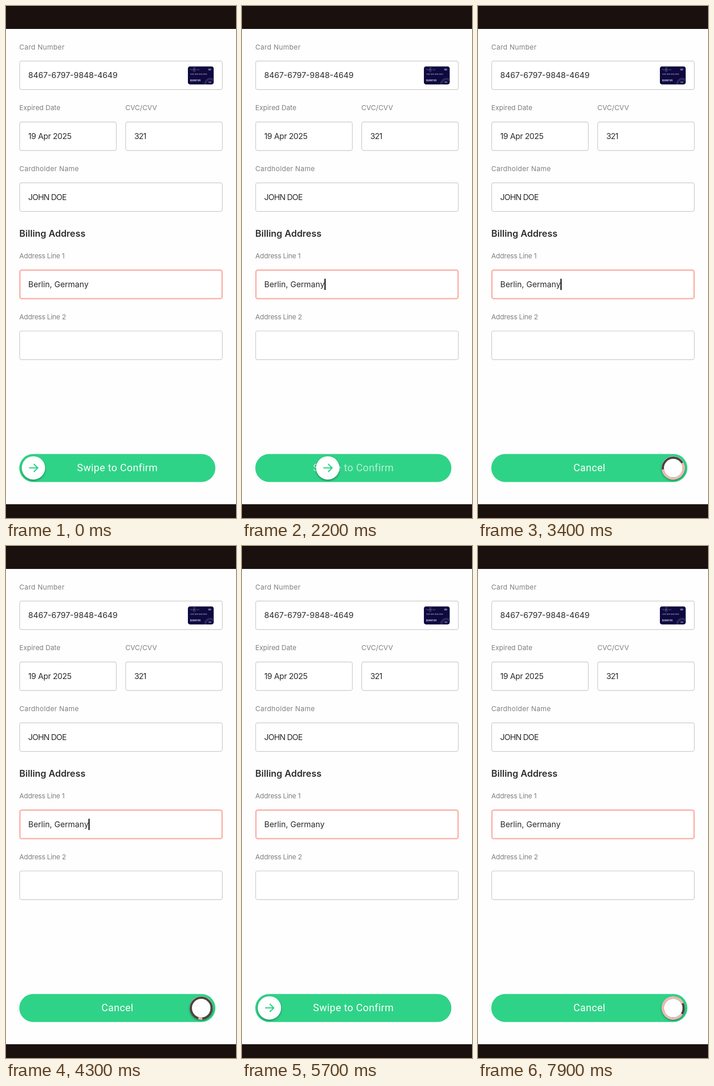
Recreate the animation shown at these times as an HTML page. Size 502 by 1116 pixels, loop 8 s.

```html
<!DOCTYPE html>
<html lang="en">
<head>
<meta charset="utf-8">
<title>Swipe to confirm</title>
<style>
html, body { margin: 0; width: 100%; height: 100%; overflow: hidden; background: #fefefe; }
svg { display: block; width: 100%; height: 100%; }
text { font-family: Inter, "Open Sans", sans-serif; white-space: pre; }
.label { font-size: 15px; fill: #808083; }
.value { font-size: 17.4px; fill: #2b2b2d; }
.title { font-size: 20px; font-weight: 600; fill: #2b2d2e; }
.action { font: 22px Roboto, sans-serif; letter-spacing: .5px; fill: #fff; text-anchor: middle; }
.field { fill: #fff; stroke: #cbcbcb; stroke-width: 1.4; }
.focus { stroke: #fcaea5; stroke-width: 2.8; }
.tiny { fill: #e8e8f2; }
</style>
</head>
<body>
<svg viewBox="0 0 502 1116" preserveAspectRatio="none">
  <defs>
    <filter id="shadow" x="-30%" y="-30%" width="160%" height="170%">
      <feDropShadow dx="0" dy="2.2" stdDeviation="1.9" flood-color="#06391f" flood-opacity=".5"/>
    </filter>
    <clipPath id="cardClip"><rect x="397" y="131.7" width="56.3" height="39.2" rx="4.5"/></clipPath>
    <clipPath id="pill"><rect x="29" y="976.5" width="428" height="61" rx="30.5"/></clipPath>
  </defs>
  <rect width="502" height="1116" fill="#fefefe"/>
  <rect width="502" height="50" fill="#1a110f"/>
  <rect width="502" height="1" fill="#050303"/>
  <rect y="1086" width="502" height="30" fill="#1a110f"/>
  <g id="form"></g>

  <g clip-path="url(#cardClip)">
    <rect x="397" y="131" width="57" height="41" fill="#0e0a40"/>
    <path d="M411 131v13" stroke="#2b285b" stroke-width="5"/>
    <circle cx="446" cy="170" r="11" fill="none" stroke="#2a275a" stroke-width="5"/>
    <rect x="441" y="136.6" width="7" height="4" rx="2" fill="#6d6b95"/>
    <rect x="442" y="164.6" width="6" height="2.6" fill="#6d6b95"/>
    <text class="tiny" x="402" y="139.8" font-size="3" opacity=".55">Payment Card</text>
    <text class="tiny" x="402" y="150.3" font-size="3.6">1234 1234 1234 0000</text>
    <text class="tiny" x="401.8" y="163.5" font-size="5" font-weight="700">$2887.65</text>
  </g>

  <rect id="caret" x="180" y="594.5" width="2.4" height="24.5" fill="#000"/>

  <rect x="29" y="976.5" width="428" height="61" rx="30.5" fill="#2fd387"/>
  <text id="swipe" class="action" x="243.2" y="1014.3">Swipe to Confirm</text>
  <text id="cancel" class="action" x="243.2" y="1014.3">Cancel</text>
  <g clip-path="url(#pill)">
    <g id="thumb">
      <circle r="25.4" fill="#fff" filter="url(#shadow)"/>
      <path id="arrow" d="M-9.5 0H9M.8 -8.7L9.5 0L.8 8.7" fill="none" stroke="#2fd387" stroke-width="2.5"/>
      <g id="loader" fill="none" stroke-width="5">
        <circle cy=".5" r="22.8" stroke="#4f4340"/>
        <path id="arc" stroke="#ecbab3"/>
      </g>
    </g>
  </g>
</svg>
<script>
const $ = id => document.getElementById(id);
const LOOP = 8000, START = 59.8, TRAVEL = 366.3, MID = 1006.8;

const text = (cls, x, y, s, gap = 0) =>
  `<text class="${cls}" x="${x}" y="${y}" letter-spacing="${gap}">${s}</text>`;
const field = (x, y, w, cls = "") =>
  `<rect class="field ${cls}" x="${x}" y="${y}" width="${w}" height="62.3" rx="4"/>`;

$("form").innerHTML = [
  text("label", 29, 94.6, "Card Number", .35),
  field(29.8, 120, 442.4),
  text("value", 48.5, 157.3, "8467-6797-9848-4649"),
  text("label", 29, 227.4, "Expired Date", -.05),
  field(29.8, 252.7, 211),
  text("value", 48.5, 290, "19 Apr 2025", -.45),
  text("label", 260.5, 227.4, "CVC/CVV"),
  field(261.3, 252.7, 211),
  text("value", 280, 290, "321", -.9),
  text("label", 29, 360.3, "Cardholder Name", .35),
  field(29.8, 385.5, 442.4),
  text("value", 48.5, 423, "JOHN DOE", -.9),
  text("title", 29, 503.4, "Billing Address"),
  text("label", 29, 550.2, "Address Line 1", -.3),
  field(30.4, 575.6, 441.2, "focus"),
  text("value", 48.5, 612.9, "Berlin, Germany"),
  text("label", 29, 683, "Address Line 2", -.3),
  field(29.8, 708.4, 442.4)
].join("");

const clamp = v => Math.min(1, Math.max(0, v));
const smooth = v => v * v * (3 - 2 * v);
const span = (t, from, to) => clamp((t - from) / (to - from));

// cubic-bezier(.4, 0, .2, 1)
function ease(x) {
  let lo = 0, hi = 1;
  for (let i = 0; i < 24; i++) {
    const s = (lo + hi) / 2, r = 1 - s;
    if (1.2 * s * r * r + .6 * s * s * r + s * s * s < x) lo = s; else hi = s;
  }
  return smooth(lo);
}

function slide(t) {
  if (t < 4350) return smooth(span(t, 1800, 2810));
  if (t < 6000) return 1 - ease(span(t, 4350, 4850));
  return smooth(span(t, 6830, 7126));
}

// Head runs ahead for half a turn, then the tail catches up.
function arcPath(t) {
  const turn = 1332, r = 22.8, cap = 6.2;
  const u = t % turn / turn;
  const head = 290 * ease(clamp(2 * u));
  const tail = 290 * ease(clamp(2 * u - 1));
  const base = 286 * u + 216 * Math.floor(t / turn) - 90;
  const point = deg => {
    const a = deg * Math.PI / 180;
    return `${r * Math.cos(a)} ${r * Math.sin(a) + .5}`;
  };
  const sweep = head - tail + 2 * cap;
  return `M${point(base + tail)}A${r} ${r} 0 ${sweep > 180 ? 1 : 0} 1 ${point(base + tail + sweep)}`;
}

const show = (id, on) => $(id).setAttribute("visibility", on ? "visible" : "hidden");

function draw(t) {
  const p = slide(t);
  const since = t >= 7325 ? t - 7325 : t >= 3120 && t < 4350 ? t - 3120 : -1;
  const busy = since >= 0;
  $("thumb").setAttribute("transform", `translate(${START + TRAVEL * p} ${MID})`);
  $("swipe").setAttribute("opacity", 1 - p);
  show("swipe", !busy);
  show("cancel", busy);
  show("arrow", !busy);
  show("loader", busy);
  if (busy) $("arc").setAttribute("d", arcPath(since));
  show("caret", (t + 800) % 1000 < 500);
}

const begin = performance.now();
function tick() {
  draw((performance.now() - begin) % LOOP);
  requestAnimationFrame(tick);
}
tick();
</script>
</body>
</html>
```
